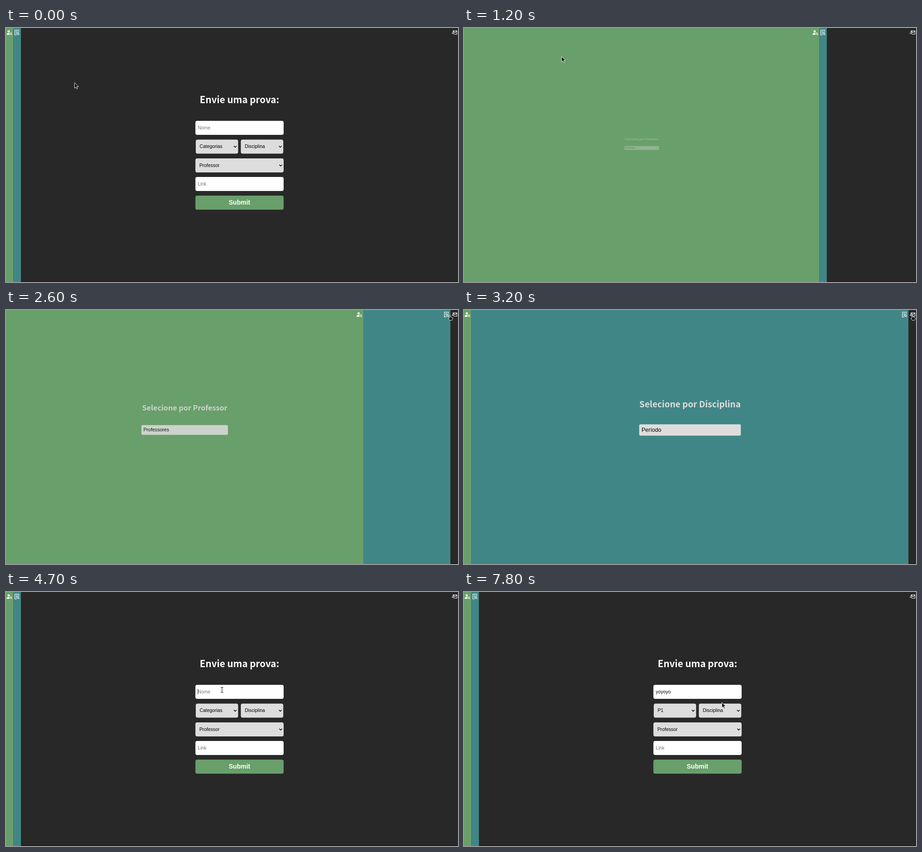
An HTML page that plays this animation: 998x561 px, repeating every 8000 ms.

```html
<!DOCTYPE html>
<html lang="pt">
<head>
<meta charset="utf-8">
<title>Envie uma prova</title>
<style>
  html, body { margin: 0; width: 100%; height: 100%; overflow: hidden; background: #282828; }
  svg { display: block; width: 100vw; height: 100vh; }
  text { font-family: "Liberation Sans", Arial, sans-serif; font-size: 10.4px; white-space: pre; }
  .title { font-family: "Noto Sans CJK JP", "Noto Sans", sans-serif; font-weight: 700; text-anchor: middle; }
  .line { fill: none; stroke: #fff; stroke-width: 1.1; stroke-linejoin: round; }
</style>
</head>
<body>
<svg id="stage" viewBox="0 0 998 561" xmlns="http://www.w3.org/2000/svg"></svg>
<script>
const LOOP = 8000, STEP = 100, W = 998, H = 561, MIN = 16.5, MID = 265;
const GREEN = '#699f6a', TEAL = '#418686', DARK = '#282828', GRAY = '#ddd';

const stage = document.getElementById('stage');
const $ = id => document.getElementById(id);
const rect = (x, y, w, h, fill, r = 0, extra = '') =>
  `<rect x="${x}" y="${y}" width="${w}" height="${h}" rx="${r}" fill="${fill}" ${extra}/>`;
const label = (x, y, str, fill = '#000', extra = '') =>
  `<text x="${x}" y="${y}" fill="${fill}" ${extra}>${str}</text>`;
const title = (y, size, str, fill) =>
  `<text class="title" x="0" y="${y}" fill="${fill}" style="font-size:${size}px">${str}</text>`;
const chevron = (x, y) =>
  `<path d="M${x - 3} ${y - 1.5}l3 3l3-3" fill="none" stroke="#000" stroke-width="1.5"/>`;

// Contents are centred on x = 0, each panel places its own group.
const search = (heading, field) =>
  title(214.5, 19, heading, GRAY) +
  rect(-112.2, 252.5, 224.4, 25, GRAY, 3) +
  label(-107, 268.5, field, '#000', 'style="font-size:12.48px"');

const select = (x, y, w, str, id, pad) =>
  rect(x, y, w, 31, GRAY, 4) +
  label(x + pad, y + 18.8, str, '#000', `id="${id}"`) +
  chevron(x + w - 6.5, y + 15.5);

const form =
  title(165.5, 20.6, 'Envie uma prova:', '#fff') +
  rect(-97.3, 205, 194.8, 31, '#fff', 4) + label(-92, 224, 'Nome', '#757575', 'id="name"') +
  rect(0, 214, 0.8, 12, '#000', 0, 'id="caret"') +
  select(-96.5, 246.5, 93.5, 'Categorias', 'category', 8.5) +
  select(3, 246.5, 93.7, 'Disciplina', 'subject', 8.8) +
  select(-97.3, 288, 194.8, 'Professor', 'teacher', 8.7) +
  rect(-97.3, 329, 194.8, 31, '#fff', 4) + label(-92, 347.6, 'Link', '#757575') +
  rect(-97.3, 370.3, 194.8, 31, GREEN, 4) +
  label(0, 389.7, 'Submit', '#fff', 'text-anchor="middle" style="font-size:14.04px;font-weight:700"');

const options = ['Categorias', 'P1', 'P2', 'P3', 'Final'];
const menu = rect(419.5, 277.5, 93.5, 82.5, GRAY) +
  rect(419.5, 0, 93.5, 16.5, '#1967d2', 0, 'id="mark"') +
  options.map((o, i) => label(424, 289.5 + i * 16.5, o, '#000', 'class="option"')).join('');

// Icons are drawn around (0, 10), which sits 9 px left of a panel's right edge.
const icons = [
  `<circle cx="-1.6" cy="7.6" r="2.5" fill="#fff"/>
   <path d="M-6 15v-1.3c0-1.7 2.2-2.7 4.4-2.8q.7 0 1.4.2a4 4 0 0 0 .8 3.9z" fill="#fff"/>
   <circle cx="3" cy="12.3" r="1.8" class="line"/><path d="M4.3 13.6l1.7 1.8" class="line"/>`,
  `<path d="M4.3 8.5V4.5H-4.6V15.4H-.5M-2.7 7H2.5M-2.7 9.2H0M-2.7 11.5H-1" class="line"/>
   <circle cx="2.2" cy="12" r="2.1" class="line"/><path d="M3.7 13.5l1.8 2" class="line"/>`,
  `<path d="M-3.2 8.8V6.3H5.4V13.7H-2.2M-3.1 6.7L1.1 10.3L5.3 6.7M-4.6 9.7H-1.2M-6 11.6H-1.2" class="line"/>`
];

const shapes = {
  arrow: `<path d="M.4 .8V13L3.2 10.4L5.3 14.8L7.2 13.9L5.2 9.6H9Z" fill="#111" stroke="#fff" stroke-width=".9"/>`,
  hand: `<path d="M-1 7V1.2Q-1 .4 0 .4T1 1.2V4.3L5 5.1Q6 5.4 6 6.5V9Q5.7 10 5 11.7H-.6L-2.9 8.2Q-3 7 -2 7Z"
    fill="#111" stroke="#fff" stroke-width=".9" stroke-linejoin="round"/>`,
  beam: `<path d="M-2.7-5.5H-.7L0-5L.7-5.5H2.7M0-5V5M-2.7 5.5H-.7L0 5L.7 5.5H2.7" fill="none" stroke="#fff" stroke-width="2"/>
    <path d="M-2.7-5.5H-.7L0-5L.7-5.5H2.7M0-5V5M-2.7 5.5H-.7L0 5L.7 5.5H2.7" fill="none" stroke="#111" stroke-width="1.1"/>`
};

const bodies = [search('Selecione por Professor', 'Professores'), search('Selecione por Disciplina', 'Período'), form];
stage.innerHTML =
  [GREEN, TEAL, DARK].map((c, i) =>
    rect(0, 0, 0, H, c, 0, `id="panel${i}"`) +
    (i === 2 ? rect(0, 560.3, W, 0.7, '#111', 0, 'id="foot"') : '') +
    `<g id="body${i}">${bodies[i]}</g><g id="icon${i}">${icons[i]}</g>`).join('') +
  `<g id="menu">${menu}</g>` +
  Object.keys(shapes).map(k => `<g id="${k}">${shapes[k]}</g>`).join('');

const clamp = v => Math.min(1, Math.max(0, v));
const bezier = (x1, y1, x2, y2) => x => {
  const at = (a, b, s) => 3 * a * s * (1 - s) ** 2 + 3 * b * s * s * (1 - s) + s ** 3;
  let lo = 0, hi = 1;
  for (let i = 0; i < 24; i++) {
    const s = (lo + hi) / 2;
    if (at(x1, x2, s) < x) lo = s; else hi = s;
  }
  return at(y1, y2, (lo + hi) / 2);
};
const ease = bezier(0.25, 0.1, 0.25, 1), easeInOut = bezier(0.42, 0, 0.58, 1);
const part = (t, start, dur, fn) => fn(clamp((t - start) / dur));

// Panel switches: start time, closing panel, opening panel.
const switches = [[1047.7, 2, 0], [2555, 0, 1], [3260.8, 1, 2]];

function panels(t) {
  let share = [0, 0, 1], scale = [0, 0, 1];
  for (const [start, from, to] of switches) {
    if (t < start) break;
    const p = part(t, start, 300, ease);
    share = [0, 0, 0];
    scale = [0, 0, 0];
    share[from] = 1 - p;
    share[to] = p;
    scale[from] = 1 - part(t, start, 168, easeInOut);
    scale[to] = part(t, start + 121.5, 76, easeInOut);
  }
  let x = 0;
  share.forEach((s, i) => {
    const w = MIN + s * (W - 3 * MIN), k = scale[i], body = $('body' + i);
    $('panel' + i).setAttribute('x', x);
    $('panel' + i).setAttribute('width', w);
    if (i === 2) $('foot').setAttribute('x', x);
    body.setAttribute('transform', `translate(${x + w / 2} ${MID}) scale(${k}) translate(0 ${-MID})`);
    body.setAttribute('opacity', k);
    body.style.display = k > 0.005 ? '' : 'none';
    x += w;
    $('icon' + i).setAttribute('transform', `translate(${x - (i === 2 ? 7.7 : 9)} 0)`);
  });
}

const path = [
  [100, 151, 120, 'arrow'], [500, 75, 60, 'arrow'], [900, 5, 11, 'hand'], [1000, 5, 11, 'hand'],
  [1100, 90, 35, 'arrow'], [1200, 215, 62, 'arrow'], [1400, 700, 60, 'arrow'],
  [1600, 974, 9, 'hand'], [1800, 974, 9, 'hand'], [2100, 987, 8, 'hand'], [2400, 980, 11, 'hand'],
  [2500, 980, 11, 'hand'], [2600, 980, 11, 'hand'], [3200, 990, 11, 'hand'], [3300, 960, 45, 'arrow'],
  [3400, 730, 196, 'arrow'], [3700, 560, 225, 'beam'], [4000, 477, 216, 'beam'], [6000, 477, 216, 'beam'],
  [6100, 534, 199, 'arrow'], [6200, 533, 229, 'beam'], [6300, 533, 229, 'beam'], [6500, 500, 245, 'arrow'],
  [6900, 468, 262, 'arrow'], [7200, 462, 302, 'arrow'], [7500, 462, 302, 'arrow'], [7800, 569, 243, 'arrow']
];

function cursor(t) {
  let i = path.length - 1;
  while (i > 0 && path[i][0] > t) i--;
  const a = path[i], b = path[i + 1] || a;
  const p = b === a ? 0 : clamp((t - a[0]) / (b[0] - a[0]));
  const x = a[1] + (b[1] - a[1]) * p, y = a[2] + (b[2] - a[2]) * p;
  for (const k in shapes) {
    $(k).style.display = k === a[3] ? '' : 'none';
    $(k).setAttribute('transform', `translate(${x} ${y})`);
  }
  return y;
}

function fields(t, y) {
  const n = t < 4900 ? 0 : t < 5100 ? 2 : t < 5200 ? 3 : t < 5300 ? 4 : 6;
  $('name').textContent = n ? 'yoyoyo'.slice(0, n) : 'Nome';
  $('name').setAttribute('fill', n ? '#000' : '#757575');
  $('caret').style.display = t >= 4700 && t < 5900 ? '' : 'none';
  $('caret').setAttribute('x', -92 + n * 5.49);
  $('category').textContent = t < 7600 ? 'Categorias' : 'P1';

  $('menu').style.display = t >= 6900 && t < 7600 ? '' : 'none';
  const row = Math.max(0, Math.floor((y - 277.5) / 16.5));
  $('mark').setAttribute('y', 277.5 + row * 16.5);
  document.querySelectorAll('.option').forEach((o, i) => o.setAttribute('fill', i === row ? '#fff' : '#000'));
}

function draw(t) {
  panels(t);
  fields(t, cursor(t));
}

const begin = performance.now();
function tick() {
  const t = (performance.now() - begin) % LOOP;
  draw(Math.floor(t / STEP) * STEP);
  requestAnimationFrame(tick);
}
tick();
</script>
</body>
</html>
```
